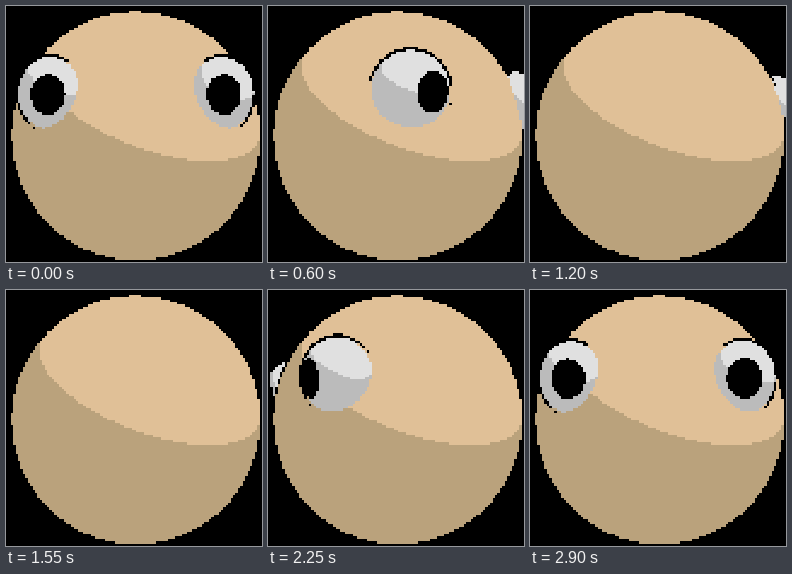
Write an HTML page with a canvas that moves like this. It is 256 px wide and 256 px high and loops after 2.95 s.

```html
<!DOCTYPE html>
<html lang="en">
<head>
<meta charset="utf-8">
<title>Turning ball with eyes</title>
<style>
  html, body { margin: 0; width: 100%; height: 100%; overflow: hidden; background: #000; }
  canvas { display: block; width: 100vw; height: 100vh; image-rendering: pixelated; }
</style>
</head>
<body>
<canvas id="stage"></canvas>
<script>
const LOOP = 2950, STEP = 50;
const SIZE = 106, STAGE = 256;
const CENTER = 130, FOCAL = 351, CAMERA_Z = 3;
const LIGHT = [0.297, 0.794, 0.531], LIT_LIMIT = 0.481;
const SKIN = [[224, 192, 151], [186, 162, 124]];
const WHITE = [[224, 224, 224], [187, 187, 187]];
const BLACK = [0, 0, 0];
const BALL = { center: [0, 0, 0], out: [0, 0, 1], depth: 1 };
const BALL_OUTLINE = 1.015;
const EYE_RADIUS = 0.229, EYE_OUTLINE = 0.246, EYE_DEPTH = 0.7;
const EYE_ORBIT = 0.95, EYE_HEIGHT = 0.268, EYE_ANGLE = 35.2;
const GAZE_PITCH = rad(-7), PUPIL_COS = Math.cos(rad(31));

// Turn of the head: [ms, degrees]
const TURN = [[0, 0], [400, 19], [800, 65], [1200, 121],
              [1900, 246], [2500, 333], [2900, 358.4], [2950, 360]];

const canvas = document.getElementById("stage");
canvas.width = canvas.height = SIZE;
const ctx = canvas.getContext("2d");
const image = ctx.createImageData(SIZE, SIZE);

function rad(degrees) { return degrees * Math.PI / 180; }
function dot(a, b) { return a[0] * b[0] + a[1] * b[1] + a[2] * b[2]; }
function direction(yaw, pitch) {
  return [Math.sin(yaw) * Math.cos(pitch), Math.sin(pitch), Math.cos(yaw) * Math.cos(pitch)];
}

function turnKey(i) {
  const n = TURN.length - 1;
  if (i < 0) return [TURN[n + i][0] - LOOP, TURN[n + i][1] - 360];
  if (i > n) return [TURN[i - n][0] + LOOP, TURN[i - n][1] + 360];
  return TURN[i];
}

function turnSlope(i) {
  const [t0, a0] = turnKey(i - 1), [t1, a1] = turnKey(i), [t2, a2] = turnKey(i + 1);
  const before = (a1 - a0) / (t1 - t0), after = (a2 - a1) / (t2 - t1);
  return (before * (t2 - t1) + after * (t1 - t0)) / (t2 - t0);
}

// Smooth cubic through the turn keys
function turnAt(time) {
  let i = 0;
  while (time >= turnKey(i + 1)[0]) i++;
  const [t0, a0] = turnKey(i), [t1, a1] = turnKey(i + 1);
  const span = t1 - t0, u = (time - t0) / span, v = 1 - u;
  return a0 * v * v * (1 + 2 * u) + a1 * u * u * (3 - 2 * u)
    + span * u * v * (turnSlope(i) * v - turnSlope(i + 1) * u);
}

function makeEye(side, turn) {
  const out = direction(rad(turn + side * EYE_ANGLE), 0);
  return {
    center: [EYE_ORBIT * out[0], EYE_HEIGHT, EYE_ORBIT * out[2]],
    out,
    depth: EYE_DEPTH,
    gaze: direction(rad(turn), GAZE_PITCH)
  };
}

// Undo the flattening of a shape along its outward direction
function stretch(v, { out, depth }) {
  const extra = dot(v, out) * (1 / depth - 1);
  return v.map((c, i) => c + out[i] * extra);
}

// Distance along the ray to the near (-1) or far (1) side of a shape
function hit(ray, shape, radius, face) {
  const [x, y, z] = shape.center;
  const dir = stretch(ray, shape), toCenter = stretch([x, y, z - CAMERA_Z], shape);
  const a = dot(dir, dir), b = dot(dir, toCenter);
  const d = b * b - a * (dot(toCenter, toCenter) - radius * radius);
  return d < 0 ? Infinity : (b + face * Math.sqrt(d)) / a;
}

// Place on the unstretched unit sphere
function unitPoint(ray, distance, shape, radius) {
  const [x, y, z] = shape.center;
  const offset = [ray[0] * distance - x, ray[1] * distance - y, CAMERA_Z + ray[2] * distance - z];
  return stretch(offset, shape).map(c => c / radius);
}

function shade(colors, point, shape) {
  const normal = stretch(point, shape);
  return colors[dot(normal, LIGHT) > LIT_LIMIT * Math.hypot(...normal) ? 0 : 1];
}

function trace(ray, eyes) {
  let nearest = hit(ray, BALL, 1, -1);
  let color = BLACK;
  if (nearest < Infinity) color = shade(SKIN, unitPoint(ray, nearest, BALL, 1), BALL);
  else nearest = hit(ray, BALL, BALL_OUTLINE, 1);

  for (const eye of eyes) {
    const outline = hit(ray, eye, EYE_OUTLINE, 1);
    if (outline < nearest) {
      nearest = outline;
      color = BLACK;
    }
    const surface = hit(ray, eye, EYE_RADIUS, -1);
    if (surface < nearest) {
      nearest = surface;
      const point = unitPoint(ray, surface, eye, EYE_RADIUS);
      color = dot(point, eye.gaze) > PUPIL_COS ? BLACK : shade(WHITE, point, eye);
    }
  }
  return color;
}

function draw(time) {
  const turn = turnAt(time);
  const eyes = [makeEye(-1, turn), makeEye(1, turn)];
  const project = i => ((i + 0.5) * STAGE / SIZE - CENTER) / FOCAL;
  for (let y = 0, p = 0; y < SIZE; y++) {
    for (let x = 0; x < SIZE; x++, p += 4) {
      image.data.set(trace([project(x), -project(y), -1], eyes), p);
      image.data[p + 3] = 255;
    }
  }
  ctx.putImageData(image, 0, 0);
}

const start = performance.now();
let shown = -1;

function tick() {
  const time = Math.floor((performance.now() - start) % LOOP / STEP) * STEP;
  if (time !== shown) draw(shown = time);
  requestAnimationFrame(tick);
}
tick();
</script>
</body>
</html>
```
